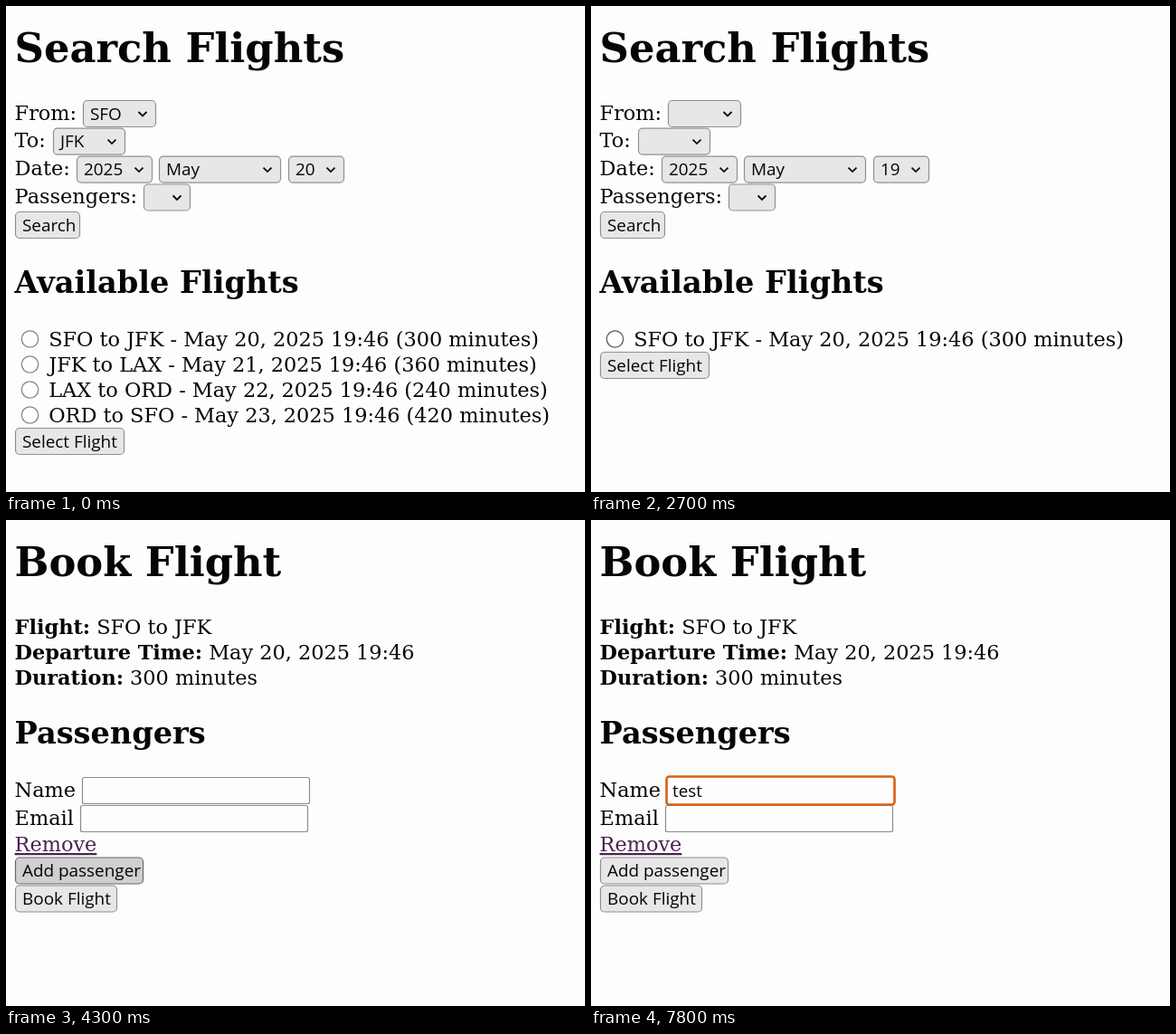
Animation of 640x537 px, one loop 8 s. Source, as an HTML page:

```html
<!DOCTYPE html>
<html lang="en">
<head>
<meta charset="utf-8">
<title>Flight booking</title>
<style>
  html, body { margin: 0; width: 100%; height: 100%; overflow: hidden; background: #fdfdfc; }
  svg { display: block; width: 640px; height: 537px; }
  text { font: 22.4px "DejaVu Serif", serif; fill: #050505; white-space: pre; }
  .h1 { font-size: 44.8px; font-weight: bold; }
  .h2 { font-size: 33.6px; font-weight: bold; }
  .ui { font: 18.9px "Open Sans", "Noto Sans", sans-serif; }
  .link { fill: #4b2350; text-decoration: underline; }
  .bold { font-weight: bold; }
</style>
</head>
<body>
<svg id="stage" viewBox="0 0 640 537"></svg>
<script>
const LOOP = 8000, LEFT = 9.6;
const stage = document.getElementById('stage');

// fill, border and text colour of a button in each state
const LOOKS = {
  normal: ['#e7e7e8', '#8f8f98', '#050505'],
  hover: ['#d0d0d3', '#676770', '#050505'],
  active: ['#b1b1b6', '#55555c', '#050505'],
  disabled: ['#f2f2f2', '#c6c6ca', '#7e7e7e']
};

const FLIGHTS = [
  'SFO to JFK - May 20, 2025 19:46 (300 minutes)',
  'JFK to LAX - May 21, 2025 19:46 (360 minutes)',
  'LAX to ORD - May 22, 2025 19:46 (240 minutes)',
  'ORD to SFO - May 23, 2025 19:46 (420 minutes)'
];

// each step overrides part of the state from its start time on
const STEPS = [
  [0, { page: 'search', from: 'SFO', to: 'JFK', day: '20', rows: 4, search: 'normal',
        select: 'normal', radio: 'normal', checked: false, add: 'normal',
        name: 'normal', email: 'normal', typed: '', caret: false }],
  [800, { search: 'hover' }],
  [1200, { search: 'active' }],
  [1300, { search: 'disabled' }],
  [1400, { search: 'hover', from: '', to: '', day: '19', rows: 1 }],
  [1700, { search: 'normal' }],
  [2700, { radio: 'hover' }],
  [3000, { radio: 'active' }],
  [3100, { radio: 'hover', checked: true }],
  [3300, { radio: 'normal' }],
  [3400, { select: 'hover' }],
  [4100, { select: 'active' }],
  [4200, { select: 'disabled' }],
  [4300, { page: 'book', add: 'hover' }],
  [4800, { add: 'normal' }],
  [4900, { name: 'hover' }],
  [5300, { name: 'focus', caret: true }],
  [6100, { typed: 't' }],
  [6400, { typed: 'te' }],
  [6600, { caret: false }],
  [6900, { typed: 'test', caret: true }],
  [7400, { caret: false, email: 'hover' }],
  [7600, { email: 'normal' }]
];

const text = (x, y, s, cls = '', fill = '') =>
  `<text x="${x}" y="${y}" class="${cls}"${fill && ` style="fill:${fill}"`}>${s}</text>`;

const box = (x, y, w, h, r, fill, stroke, line = 1) =>
  `<rect x="${x + .5}" y="${y + .5}" width="${w - 1}" height="${h - 1}" rx="${r}"
    fill="${fill}" stroke="${stroke}" stroke-width="${line}"/>`;

function button(x, y, w, label, look = 'normal') {
  const [fill, stroke, ink] = LOOKS[look];
  return box(x, y, w, 30, 4.5, fill, stroke, 1.2) + text(x + 8, y + 21.7, label, 'ui', ink);
}

const dropdown = (x, y, w, label) => button(x, y, w, label) +
  `<path d="M${x + w - 19.5} ${y + 13}l4.5 4.5 4.5-4.5" fill="none" stroke="#0c0c0c" stroke-width="1.8"/>`;

function radio(y, look, checked) {
  const circle = (r, fill, stroke, line) =>
    `<circle cx="26.5" cy="${y}" r="${r}" fill="${fill}" stroke="${stroke}" stroke-width="${line}"/>`;
  if (checked) {
    const tone = look === 'normal' ? '#e45c0c' : '#c2480a';
    return circle(8.9, '#fefefe', tone, 1.9) + circle(5.6, tone, 'none', 0);
  }
  const edge = { normal: '#85858a', hover: '#5c5c60', active: '#484848' }[look];
  return circle(9.2, look === 'active' ? '#d0d0d3' : '#fefefe', edge, 1.3);
}

function input(x, y, look) {
  return look === 'focus'
    ? box(x - 1, y - 1, 253, 32, 3, '#fefefe', '#d9600f', 2.6)
    : box(x, y, 252, 30, 2, '#fefefe', look === 'hover' ? '#5f5f62' : '#8c8c90', 1.2);
}

function searchPage(s) {
  const end = 354 + 28 * s.rows;
  return text(LEFT, 61.6, 'Search Flights', 'h1') +
    ['From:', 'To:', 'Date:', 'Passengers:']
      .map((label, i) => text(LEFT, 125.5 + 30.8 * i, label)).join('') +
    dropdown(85, 104, 81, s.from) +
    dropdown(52, 134.6, 80, s.to) +
    dropdown(78, 165.6, 84, '2025') +
    dropdown(169, 165.6, 135, 'May') +
    dropdown(312, 165.6, 62, s.day) +
    dropdown(152, 196.5, 52, '') +
    button(10, 227, 72, 'Search', s.search) +
    text(LEFT, 317, 'Available Flights', 'h2') +
    FLIGHTS.slice(0, s.rows).map((flight, i) =>
      radio(368 + 28 * i, i ? 'normal' : s.radio, !i && s.checked) +
      text(47.2, 376 + 28 * i, flight)).join('') +
    button(10, end, 121, 'Select Flight', s.select);
}

function bookPage(s) {
  const facts = [['Flight:', 'SFO to JFK'], ['Departure Time:', 'May 20, 2025 19:46'],
    ['Duration:', '300 minutes']];
  const caretX = { '': 89.5, t: 97, te: 107.5, test: 123.5 }[s.typed];
  return text(LEFT, 61.6, 'Book Flight', 'h1') +
    facts.map(([key, value], i) =>
      text(LEFT, 126 + 28 * i, `<tspan class="bold">${key}</tspan> ${value}`)).join('') +
    text(LEFT, 247, 'Passengers', 'h2') +
    text(LEFT, 306, 'Name') + text(LEFT, 337, 'Email') +
    input(82, 315, s.email) + input(84, 284, s.name) +
    text(90, 306, s.typed, 'ui') +
    (s.caret ? `<rect x="${caretX}" y="288" width="1.4" height="22" fill="#050505"/>` : '') +
    text(LEFT, 366, 'Remove', 'link') +
    button(10, 372.5, 142, 'Add passenger', s.add) +
    button(10, 403.5, 113, 'Book Flight');
}

let shown = 0;
function draw() {
  const now = performance.now() % LOOP;
  const past = STEPS.filter(([start]) => start <= now);
  if (past.length !== shown) {
    shown = past.length;
    const state = Object.assign({}, ...past.map(step => step[1]));
    stage.innerHTML = state.page === 'search' ? searchPage(state) : bookPage(state);
  }
  requestAnimationFrame(draw);
}
draw();
</script>
</body>
</html>
```
